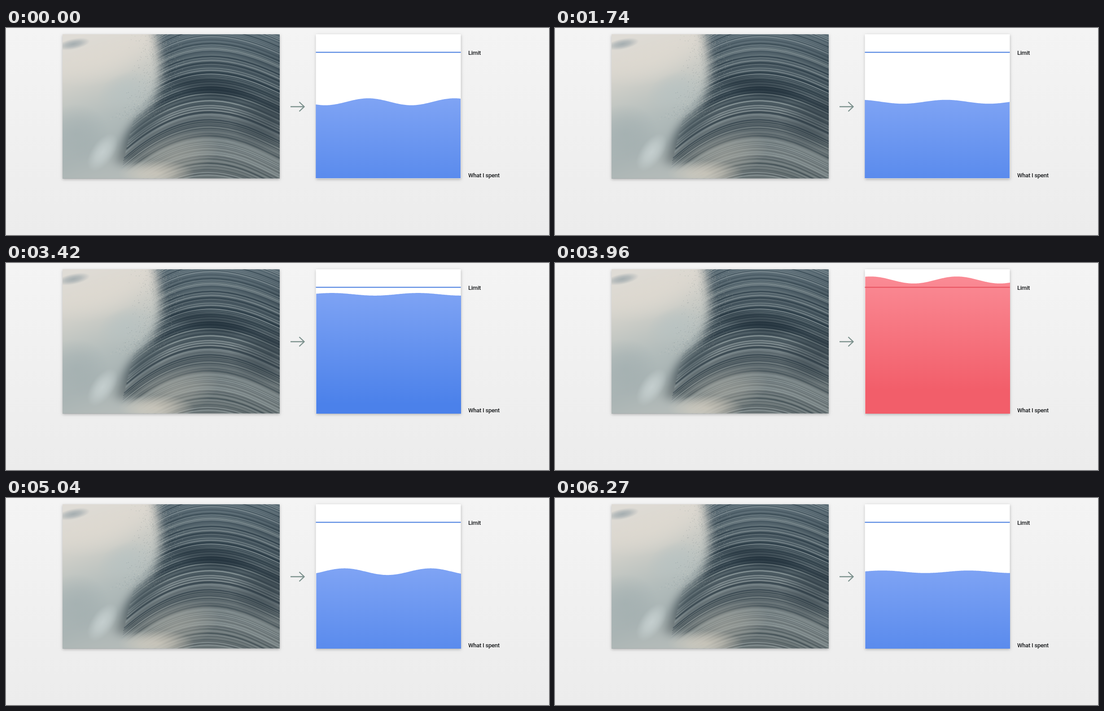
Recreate the animation shown at these times as an HTML page with a canvas. Size 1210x463 px, loop 6.3 s.

```html
<!DOCTYPE html>
<html lang="en">
<head>
<meta charset="utf-8">
<title>Spending wave</title>
<style>
  html, body { margin: 0; width: 100%; height: 100%; overflow: hidden; background: #efefef; }
  canvas { display: block; }
</style>
</head>
<body>
<canvas id="stage" width="1210" height="463"></canvas>
<script>
const W = 1210, H = 463, LOOP = 6300;
const ctx = document.getElementById('stage').getContext('2d');

const photo = { x: 126, y: 14, w: 484, h: 322.5 };
const card = { x: 690.5, y: 14, w: 323, h: 322.5 };
const LIMIT = 54;
const BLUE = { top: [126, 163, 244], end: [75, 129, 234], line: [72, 125, 222] };
const RED = { top: [250, 138, 148], end: [242, 94, 106], line: [231, 82, 95] };

// time, crest position, swell phase in half turns
const KEYS = [
  [0, 615, 0.08], [1740, 871, 2.317], [2640, 1001, 3.41], [3420, 1110, 4.38],
  [4620, 1273, 5.63], [5520, 1395, 6.68], [6300, 1502, 7.65]
];
// start time, target level
const MOVES = [[2005, 103.7], [3325, 38], [4645, 165]];
const MOVE_TIME = 450;

const clamp = v => Math.max(0, Math.min(1, v));
const mix = (a, b, k) => a + (b - a) * k;
const easeOut = k => 1 - (1 - k) ** 3;
const moved = (t, start) => easeOut(clamp((t - start) / MOVE_TIME));
const rgb = c => `rgb(${c.map(Math.round).join()})`;

function gradient(g, x0, y0, x1, y1, colors) {
  const fill = g.createLinearGradient(x0, y0, x1, y1);
  colors.forEach((c, i) => fill.addColorStop(i / (colors.length - 1), c));
  return fill;
}

function shadowBox(g, r, color) {
  g.save();
  g.shadowColor = 'rgba(0,0,0,.25)';
  g.shadowBlur = 6;
  g.shadowOffsetY = 2;
  g.fillStyle = color;
  g.fillRect(r.x, r.y, r.w, r.h);
  g.restore();
}

function glow(g, x, y, rx, ry, color, alpha, turn = 0) {
  g.save();
  g.translate(x, y);
  g.rotate(turn);
  g.scale(rx, ry);
  g.globalAlpha = alpha;
  const fill = g.createRadialGradient(0, 0, 0, 0, 0, 1);
  fill.addColorStop(0, `rgb(${color})`);
  fill.addColorStop(0.45, `rgba(${color},.7)`);
  fill.addColorStop(1, `rgba(${color},0)`);
  g.fillStyle = fill;
  g.fillRect(-1, -1, 2, 2);
  g.restore();
}

function drawStrands(g, rand) {
  g.filter = 'blur(0.4px)';
  for (let r = -10; r < 450; r += 2.6) {
    const depth = clamp(r / 340);
    const light = rand() < mix(0.4, 0.62, depth);
    const yr = r + rand() * 4;
    g.strokeStyle = light ? '#a3afb0' : '#1f303b';
    g.globalAlpha = 0.15 + rand() * 0.45;
    g.lineWidth = 0.7 + rand() * 1.9;
    g.beginPath();
    g.moveTo(620, yr);
    g.bezierCurveTo(535, yr - 40, 425, yr - mix(65, 125, depth), mix(335, 240, depth), yr + mix(-5, 45, depth));
    g.stroke();
  }
  g.filter = 'none';
  g.globalAlpha = 1;
}

function drawPhoto(g) {
  const { x, y, w, h } = photo;
  let seed = 17;
  const rand = () => (seed = (seed * 16807) % 2147483647) / 2147483647;

  shadowBox(g, photo, '#8b989a');
  g.save();
  g.beginPath();
  g.rect(x, y, w, h);
  g.clip();
  g.fillStyle = gradient(g, 0, y, 0, y + h, ['#60717a', '#485861', '#3f4f58', '#5d696e', '#6d7779', '#646e70']);
  g.fillRect(x, y, w, h);
  drawStrands(g, rand);
  glow(g, 460, 132, 120, 28, '24,38,49', 0.5, 0.15);
  glow(g, 590, 205, 90, 70, '34,48,58', 0.5);
  glow(g, 300, 222, 90, 34, '62,78,86', 0.65, -0.7);
  glow(g, 375, 290, 105, 55, '176,175,165', 0.5, -0.35);

  // spray
  g.filter = 'blur(11px)';
  g.fillStyle = gradient(g, 165, 14, 270, 320, ['#dfdcd6', '#dbd7cf', '#c6c9c4', '#b2bcbb', '#a8b3b3', '#b4bbb9']);
  g.beginPath();
  g.moveTo(80, -30);
  g.lineTo(322, -30);
  g.bezierCurveTo(350, 70, 360, 140, 308, 190);
  g.bezierCurveTo(250, 235, 262, 280, 240, 300);
  g.quadraticCurveTo(330, 305, 405, 370);
  g.lineTo(80, 370);
  g.fill();
  g.filter = 'none';
  glow(g, 215, 75, 110, 50, '224,219,210', 0.5, -0.3);
  glow(g, 265, 140, 65, 40, '182,194,194', 0.6, -0.4);
  glow(g, 155, 235, 75, 65, '156,169,171', 0.5);
  glow(g, 215, 278, 25, 48, '203,213,213', 0.8, 0.6);
  glow(g, 335, 325, 85, 30, '211,205,192', 0.8);
  glow(g, 150, 36, 38, 12, '140,154,161', 0.7, -0.2);

  // droplets thrown off the crest
  for (let i = 0; i < 1400; i++) {
    const k = rand();
    const spread = (rand() + rand() + rand() - 1.5) * 48;
    g.globalAlpha = 0.1 + rand() * 0.3;
    g.fillStyle = rand() < 0.6 ? '#dcd8cc' : '#5d6c71';
    g.fillRect(338 + spread - 60 * k ** 4, 14 + 190 * k, 1.2, 1.2);
  }
  g.restore();
}

function drawScene(g) {
  g.fillStyle = gradient(g, 0, 0, 0, H, ['#f4f4f4', '#ececec']);
  g.fillRect(0, 0, W, H);
  drawPhoto(g);
  shadowBox(g, card, '#fff');

  g.strokeStyle = '#7c918d';
  g.lineWidth = 2.4;
  g.stroke(new Path2D('M634 176H664M653.5 165.5L664.5 176L653.5 186.5'));

  g.fillStyle = '#17191b';
  g.font = '500 13px Roboto, "Open Sans", sans-serif';
  g.letterSpacing = '-0.25px';
  g.fillText('Limit', 1030, 60);
  g.fillText('What I spent', 1030, 334);
}

function swellAt(t) {
  let i = 1;
  while (i < KEYS.length - 1 && t > KEYS[i][0]) i++;
  const a = KEYS[i - 1], b = KEYS[i];
  const k = (t - a[0]) / (b[0] - a[0]);
  return { crest: mix(a[1], b[1], k), amp: 8 * Math.cos(Math.PI * mix(a[2], b[2], k)) };
}

const levelAt = t =>
  MOVES.reduce((level, [start, target]) => mix(level, target, moved(t, start)), 165);

const scene = document.createElement('canvas');
scene.width = W;
scene.height = H;
drawScene(scene.getContext('2d'));

function draw(t) {
  const level = levelAt(t);
  const { crest, amp } = swellAt(t);
  const heat = clamp((LIMIT + 3 - level) / 8);
  const tint = part => rgb(BLUE[part].map((v, i) => mix(v, RED[part][i], heat)));

  ctx.drawImage(scene, 0, 0);

  // the water settles one pixel lower and to the right with its first rise
  const shift = moved(t, MOVES[0][0]);
  const left = 690.3 + shift;
  const right = 1013 + shift;
  const bottom = 336 + shift;
  const surface = x => level - amp * Math.cos(2 * Math.PI * (x - crest) / 192);
  ctx.beginPath();
  ctx.moveTo(left, bottom);
  for (let x = left; x < right; x += 2) ctx.lineTo(x, surface(x));
  ctx.lineTo(right, surface(right));
  ctx.lineTo(right, bottom);
  ctx.closePath();
  ctx.fillStyle = gradient(ctx, 0, level - 4, 0, level + 246, [tint('top'), tint('end')]);
  ctx.fill();

  ctx.fillStyle = tint('line');
  ctx.fillRect(card.x, LIMIT - 0.7, card.w, 2.1);
}

function tick() {
  draw(performance.now() % LOOP);
  requestAnimationFrame(tick);
}
tick();
</script>
</body>
</html>
```
